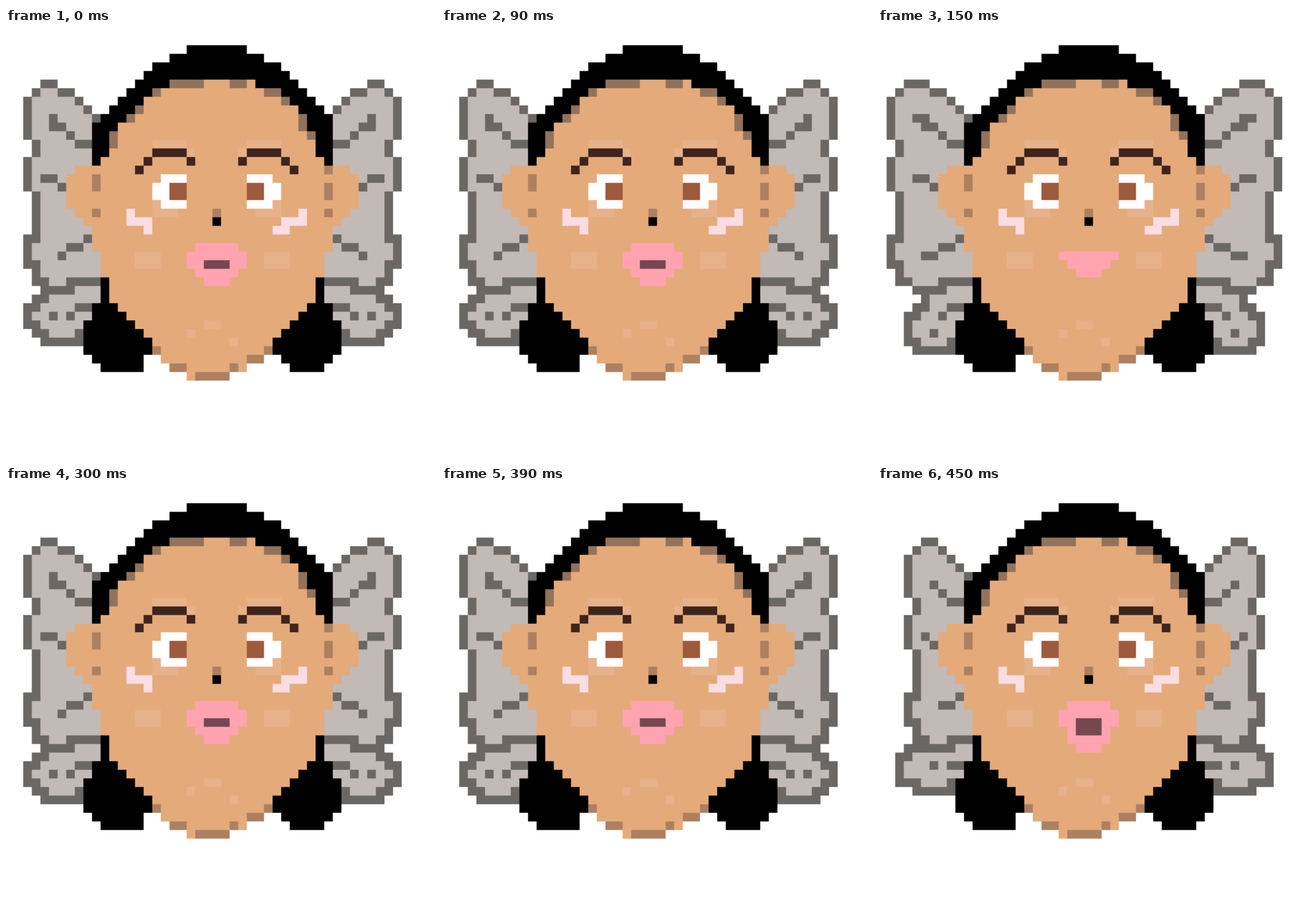
Animation, 748 px wide and 748 px high, one loop 600 ms. Source, as an HTML page with a canvas:

```html
<!DOCTYPE html>
<html lang="en">
<head>
<meta charset="utf-8">
<title>Winged face</title>
<style>
  html, body { margin: 0; height: 100%; overflow: hidden; background: #fff; }
  canvas { display: block; width: 100vw; height: 100vh; }
</style>
</head>
<body>
<canvas id="stage" width="500" height="500"></canvas>
<script>
const ctx = document.getElementById('stage').getContext('2d');
ctx.scale(10, 10); // the drawing is 50 by 50 cells

const HAIR = '#000', SKIN = '#e4aa7a', SHADE = '#ac8060', GLOW = '#e7b18a';
const FEATHER = '#c2bab6', RIM = '#6b6764', LIPS = '#ffa3b1';

function box(color, x, y, w = 1, h = 1) {
  ctx.fillStyle = color;
  ctx.fillRect(x, y, w, h);
}

// Draws a box and its reflection; sum is twice the mirror axis.
const mirror = sum => (color, x, y, w = 1, h = 1) => {
  box(color, x, y, w, h);
  box(color, sum - x - w, y, w, h);
};
const sides = mirror(48), features = mirror(49);

// Boxes are written as "x y width height", with both sizes defaulting to 1.
function boxes(color, list, draw = box) {
  list.split(',').forEach(b => draw(color, ...b.trim().split(' ').map(Number)));
}

// Fills a symmetric shape whose left edge runs through the given points.
function symmetric(color, sum, points) {
  const bottom = points[points.length - 1][1];
  for (let y = points[0][1]; y < bottom; y++) {
    const mid = y + 0.5, i = points.findIndex(p => p[1] > mid);
    const [x0, y0] = points[i - 1], [x1, y1] = points[i];
    const left = Math.round(x0 + (x1 - x0) * (mid - y0) / (y1 - y0));
    box(color, left, y, sum - 2 * left);
  }
}

// Left edge that steps to a new x at each [row, x].
const stepped = steps => y => steps.filter(s => s[0] <= y).pop()[1];

// Fills a wing part and darkens every cell with a neighbour outside it.
function feather(top, bottom, left, right, corners) {
  const inside = (x, y) => y >= top && y <= bottom && x >= left(y) && x < right(y);
  const onRim = (x, y) => {
    for (let dx = -1; dx <= 1; dx++)
      for (let dy = -1; dy <= 1; dy++)
        if ((corners || !dx || !dy) && !inside(x + dx, y + dy)) return true;
    return false;
  };
  for (let y = top; y <= bottom; y++)
    for (let x = left(y); x < Math.min(right(y), 12); x++)
      sides(onRim(x, y) ? RIM : FEATHER, x, y);
}

const upperEdge = stepped([[6, 4], [7, 3], [8, 2], [13, 3], [15, 2], [19, 3], [24, 2], [28, 3], [30, 5]]);

const rest = {
  shift: 0, bottom: 36, gape: 0,
  lobe: [[29, 7], [30, 4], [31, 3], [32, 2], [35, 3], [36, 4]],
  marks: '5 10, 5 11 2, 4 17 2, 6 26, 5 33, 7 33'
};
const spread = {
  shift: -1, bottom: 37, smile: true,
  lobe: [[29, 7], [30, 4], [31, 5], [32, 4], [33, 3], [37, 4]],
  marks: '4 10 2, 5 11 2, 4 17 2, 5 26 2, 7 33, 6 35'
};
const folded = {
  shift: 1, bottom: 35, gape: 1,
  lobe: [[29, 8], [30, 3], [31, 2], [35, 4]],
  marks: '6 11, 5 17, 6 32'
};
const poses = [rest, spread, rest, folded];

function wings({ shift, bottom, lobe, marks }) {
  const tip = 6 + Math.max(shift, 0);
  feather(6, 30, y => upperEdge(y) + shift, y => y < 7 ? tip : y < 11 ? y + 1 : 24);
  feather(29, bottom, stepped(lobe), y => y < bottom ? 24 : 9, true);
  boxes(RIM, '7 12, 8 13 2, 6 18, 9 24, 7 25 2, 8 32 2', sides);
  boxes(RIM, marks, sides);
  for (const y of [24, 27]) sides(RIM, 3 + shift, y);
}

function head() {
  symmetric(HAIR, 49, [[22, 2], [17, 4.5], [10.5, 11]]);
  box(HAIR, 10, 11, 28, 5);
  boxes(HAIR, '11 29 1 3, 10 32 9 2, 9 34 9 4, 10 38 6', sides);
  boxes(HAIR, '11 39 5, 33 39 4');

  box(SKIN, 19, 6, 10);
  symmetric(SKIN, 49, [[17.5, 7], [13.5, 11]]);
  box(SKIN, 13, 11, 22);
  symmetric(SKIN, 48, [
    [12, 12], [12, 15], [11, 15], [11, 16], [8.5, 16], [7, 17.5], [7, 20.5], [10, 23.5],
    [10, 26], [11, 26], [11, 29], [12, 29], [12, 31.5], [17, 36.5], [17, 37.5], [18, 39]
  ]);
  boxes(SKIN, '19 39 9, 21 40 5');

  // shadows along the hairline, ears and chin
  boxes('#92725a', '19 6 4, 26 6 2, 17 7, 30 7 2, 32 8, 15 9, 14 10, 34 10 1 2, 35 12, 12 12 1 2');
  boxes(SHADE, '10 17 1 2, 37 16, 37 18 1 2');
  boxes(SHADE, '10 21, 17 37', sides);
  boxes(SHADE, '28 38 2, 19 39 2, 26 39, 22 40 4');
  boxes(GLOW, '15 26 3 2, 30 26 3 2, 23 34 2, 21 35, 26 36');
}

function face() {
  boxes(GLOW, '17 13 4, 21 14, 17 20, 17 21 3', features);
  boxes('#3e241d', '17 14 4, 21 15, 16 15, 15 16', features);
  boxes('#fff', '18 17 3 4, 17 18 1 2', features);
  features('#9d5a3c', 19, 18, 2, 2);
  boxes('#fadce3', '14 21, 14 22 3, 16 23', features);
  box('#fadce3', 31, 23);
  box(SHADE, 24, 21);
  box(HAIR, 24, 22);
}

function mouth({ smile, gape }) {
  if (smile) {
    for (let i = 0; i < 3; i++) box(LIPS, 21 + i, 26 + i, 7 - 2 * i);
    return;
  }
  box(LIPS, 22, 25, 5, 4 + gape);
  box(LIPS, 21, 26, 7, 2);
  box(LIPS, 23, 29 + gape, 3);
  box('#734850', 23, 27, 3, 1 + gape);
}

function draw() {
  const pose = poses[Math.floor(performance.now() / 150) % poses.length];
  box('#fff', 0, 0, 50, 50);
  wings(pose);
  head();
  face();
  mouth(pose);
  requestAnimationFrame(draw);
}
draw();
</script>
</body>
</html>
```
